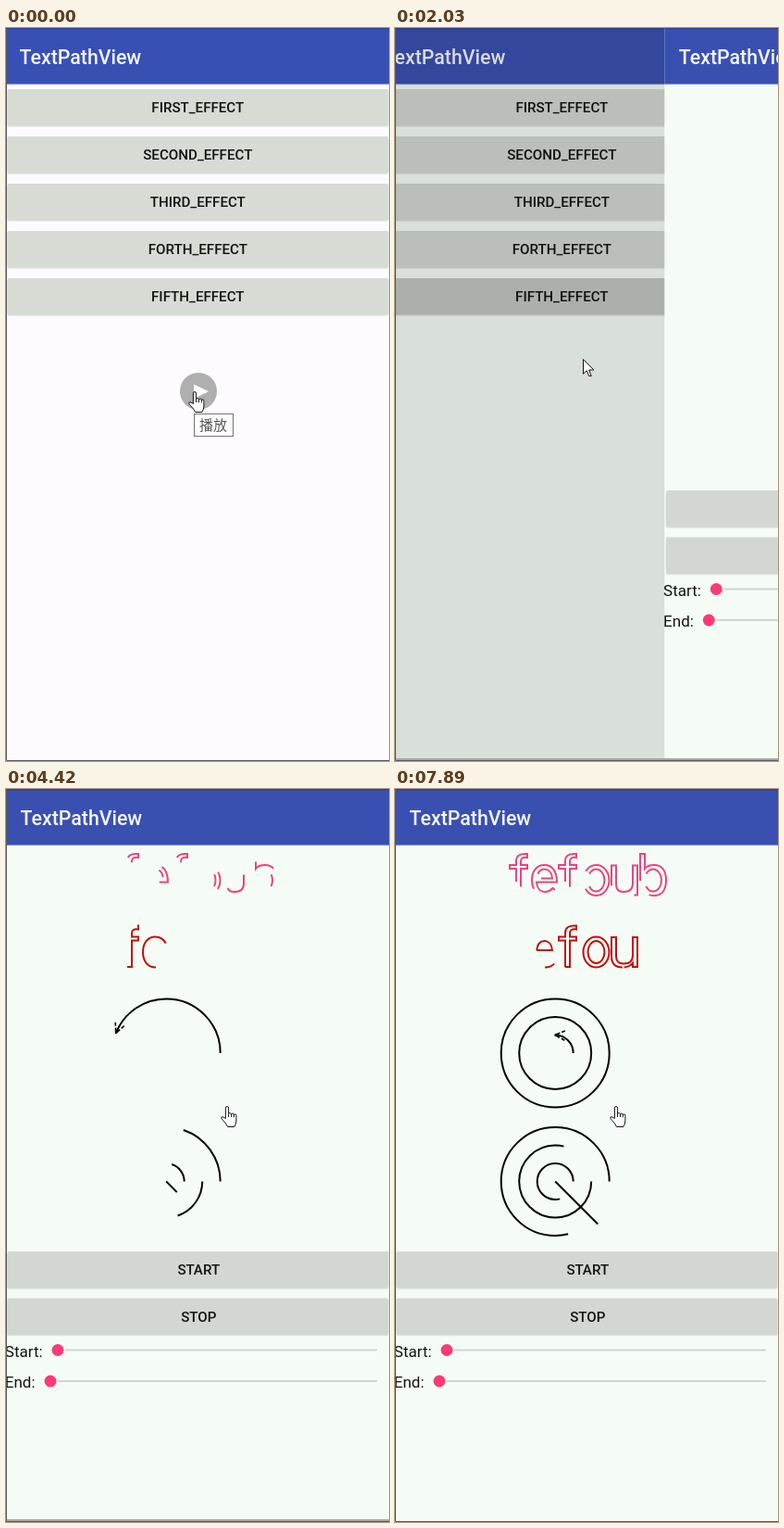
An HTML page that plays this animation: 414x791 px, repeating every 8 s.

```html
<!DOCTYPE html>
<html lang="en">
<head>
<meta charset="utf-8">
<title>Text path drawing</title>
<style>
  html, body { margin: 0; width: 414px; height: 791px; overflow: hidden; }
  svg {
    display: block; font: 500 15.15px Roboto, sans-serif;
    --bg: #f5fcf5; --bar: #3a50b0; --btn: #d2d7d1;
  }
  svg.cover { --bg: #fdfbfd; --bar: #3850b4; --btn: #d6dbd4; }
  .cover text { transform: translateX(-1px); }
  .bg { fill: var(--bg); }
  .bar { fill: var(--bar); }
  .btn { fill: var(--btn); }
  .title { font-size: 21.3px; fill: #f4f6fb; }
  .caption { text-anchor: middle; fill: #101411; }
  .label { font-size: 17px; font-weight: 400; fill: #101411; }
  .stroke { fill: none; stroke-width: 2; }
  .cursor { fill: #fff; stroke: #111; stroke-linejoin: round; }
</style>
</head>
<body>
<svg id="stage" width="414" height="791" viewBox="0 0 414 791">
  <g id="menu"></g>
  <g id="page"></g>
  <rect id="progressBar" x="1" y="788" width="413" height="2" fill="#a4aaa5"/>
  <path d="M.5 0V790.5H414" fill="none" stroke="#5a5a5a"/>
  <g id="player">
    <circle cx="208" cy="392" r="20" fill="#b0afb0"/>
    <path d="M203 384.5V400L219 392.2z" fill="#fff"/>
    <rect x="203.5" y="416.5" width="42" height="24" fill="#fff" stroke="#767676"/>
    <text x="210" y="434" fill="#575757" style="font:400 15px 'Noto Sans CJK SC','Noto Sans CJK',sans-serif">播放</text>
  </g>
  <g id="cursor" class="cursor">
    <path id="arrow" d="M.5.5V16.3L4.2 12.8 6.8 18.6H9.2L6.7 12H11.8z"/>
    <g id="hand" transform="translate(-6 -1)">
      <path d="M5.4 13.5V2.2a1.6 1.6 0 0 1 3.2 0V8.6a1.5 1.5 0 0 1 2.9.6a1.4 1.4 0 0 1 2.8.7a1.3 1.3 0 0 1 2.6.9V16q0 3-2 6.500H7.6Q6 19 2.6 15.6 0 13 .9 12.1 2.2 11 5.4 13.5z"/>
      <path d="M8.6 8.6V12M11.5 9.2V12M14.3 9.9V12.4" fill="none"/>
    </g>
  </g>
</svg>
<script>
const LOOP = 8000;
const $ = id => document.getElementById(id);
const el = (parent, tag, attrs) => {
  const node = document.createElementNS('http://www.w3.org/2000/svg', tag);
  for (const k in attrs) node.setAttribute(k, attrs[k]);
  return parent.appendChild(node);
};
const show = (node, on) => node.setAttribute('visibility', on ? 'inherit' : 'hidden');

// Linear interpolation through [time, value] knots
function track(t, knots) {
  const i = knots.findIndex(k => k[0] > t);
  if (i === 0) return knots[0][1];
  if (i < 0) return knots[knots.length - 1][1];
  const [t0, v0] = knots[i - 1], [t1, v1] = knots[i];
  return v0 + (v1 - v0) * (t - t0) / (t1 - t0);
}

// The screen refreshes in runs of even steps: [first, last, count]
const runs = [[150, 1140, 8], [1260, 2170, 8], [2410, 3310, 8], [3470, 4420, 8],
  [4570, 5560, 8], [5710, 6690, 9], [6810, 7740, 8], [7890, 7890, 1]];
function snap(t) {
  const run = runs.filter(r => r[0] <= t).pop();
  if (!run) return 0;
  const [first, last, n] = run, gap = (last - first) / (n - 1) || 1;
  return first + Math.min(n - 1, Math.floor((t - first) / gap + 1e-6)) * gap;
}

// App screens
function screen(g) {
  el(g, 'rect', { class: 'bg', width: 414, height: 790 });
  el(g, 'rect', { y: 61, width: 414, height: 1, fill: '#000', opacity: .06 });
  el(g, 'rect', { class: 'bar', width: 414, height: 60.6 });
  el(g, 'rect', { width: 414, height: 1.5, fill: '#000', opacity: .15 });
  el(g, 'text', { class: 'title', x: 15.5, y: 39 }).textContent = 'TextPathView';
}
function button(g, y, text) {
  const box = { x: 1.5, y, width: 412, height: 39.5, rx: 2 };
  el(g, 'rect', { ...box, y: y + 1.2, fill: '#000', opacity: .1 });
  el(g, 'rect', { ...box, class: 'btn' });
  const press = el(g, 'rect', { ...box, fill: '#000', opacity: .08, visibility: 'hidden' });
  el(g, 'text', { class: 'caption', x: 208.3, y: y + 25 }).textContent = text;
  return press;
}
function slider(g, y, text, x) {
  el(g, 'text', { class: 'label', x: -1.2, y: y + 7 }).textContent = text;
  el(g, 'rect', { x: x + 8, y: y - 1, width: 393 - x, height: 2, fill: '#cfd6cf' });
  el(g, 'circle', { cx: x, cy: y, r: 6.5, fill: '#fb3b77' });
}

const menu = $('menu'), page = $('page');
screen(menu);
const [fifthPress] = ['FIRST', 'SECOND', 'THIRD', 'FORTH', 'FIFTH']
  .map((name, i) => button(menu, 66 + 51 * i, name + '_EFFECT')).slice(-1);
const shade = el(menu, 'rect', { width: 450, height: 790, fill: '#000' });
screen(page);
const startPress = button(page, 499, 'START');
button(page, 549.5, 'STOP');
slider(page, 605.5, 'Start:', 56);
slider(page, 639, 'End:', 48);

// Outline lettering: one entry per contour
const oval = (x, y, rx, ry) =>
  `M${x - rx} ${y}a${rx} ${ry} 0 0 1 ${2 * rx} 0a${rx} ${ry} 0 0 1 ${-2 * rx} 0`;
const letterF = x => `M${x + 7} 114.5V86h-7v-4h7v-4q0-9 12-8v4q-7-1-7 4v4h7v4h-7v28.5z`;
const word = [
  letterF(124),
  'M162 115C153 115 148 108 148 98.5S153 82 161.5 82S175 89 175 100.5H153C153.5 107 157 111 162 111Q167 111 170.5 107L173.5 109.5Q169.5 115 162 115z',
  'M153.2 96.5C154 90 157 86.5 161.5 86.5S169.5 90 170 96.5z',
  letterF(177),
  oval(217.5, 98.5, 14, 16.5), oval(217.5, 98.5, 9, 12),
  'M246 115Q234 115 234 103V82.5H239V103Q239 111 247 111Q257 111 257 102V82.5H262V114.5H257V110.5Q253 115 246 115z',
  'M265 114.5V70H270V86Q273 82 280 82C289 82 293 89 293 98.5S289 115 280 115Q273 115 270 110.5V114.5z',
  oval(279, 98.5, 9, 12)
];

// Rings: dir -1 runs over the top, 1 runs under the bottom
const CENTER = 173.2;
const ring = (y, r, dir) => {
  const sweep = dir > 0 ? 1 : 0;
  return `M${CENTER + r} ${y}a${r} ${r} 0 0 ${sweep} ${-2 * r} 0a${r} ${r} 0 0 ${sweep} ${2 * r} 0`;
};
const target = y => [ring(y, 58.5, -1), ring(y, 39, 1), ring(y, 19.5, -1),
  `M${CENTER} ${y}l58.5 58.5`];

function group(contours, color, dy = 0) {
  const g = el(page, 'g', { class: 'stroke', stroke: color, transform: `translate(0 ${dy})` });
  return contours.map(d => {
    const node = el(g, 'path', { d });
    return { node, len: node.getTotalLength() };
  });
}
function reveal({ node, len }, from, to) {
  const a = Math.max(0, from), b = Math.min(len, to);
  show(node, b > a);
  node.setAttribute('stroke-dasharray', `0 ${a} ${b - a} ${len + 1}`);
}
const together = (paths, a, b) => paths.forEach(p => reveal(p, a * p.len, b * p.len));
const total = paths => paths.reduce((sum, p) => sum + p.len, 0);
function inTurn(paths, a, b) {
  const all = total(paths);
  let at = 0;
  for (const p of paths) {
    reveal(p, a * all - at, b * all - at);
    at += p.len;
  }
}

const pink = group(word, '#e8457f');
const red = group(word, '#c20d0d', 77.5);
const rings = group(target(285), '#000');
const spread = group(target(423.5), '#000');
const barbs = el(page, 'path', { class: 'stroke', stroke: '#000',
  style: 'stroke-width:1.6;stroke-dasharray:6 2 4 1.5' });

// Arrow head trailing back from the pen tip
function drawBarbs(p) {
  show(barbs, p > 0);
  let at = p * total(rings), i = 0;
  while (i < rings.length - 1 && at > rings[i].len) at -= rings[i++].len;
  const { node } = rings[i];
  const tip = node.getPointAtLength(at), back = node.getPointAtLength(Math.max(0, at - 3));
  const angle = Math.atan2(back.y - tip.y, back.x - tip.x);
  barbs.setAttribute('d', [-.44, .44].map(turn =>
    `M${tip.x} ${tip.y}l${13 * Math.cos(angle + turn)} ${13 * Math.sin(angle + turn)}`).join(''));
}

function draw(t) {
  const playing = t >= 150;
  $('stage').setAttribute('class', playing ? '' : 'cover');
  show($('player'), !playing);
  show($('progressBar'), playing && t < 5000);

  const slide = track(t, [[1850, 414], [1910, 291.3], [2040, 70], [2170, 0]]);
  const moved = 414 - slide;
  menu.setAttribute('transform', `translate(${-moved * .228} 0)`);
  page.setAttribute('transform', `translate(${slide} 0)`);
  show(page, moved > 0);
  shade.setAttribute('opacity', moved / 414 * .38);
  show(fifthPress, t >= 1640);
  show(startPress, t >= 3150 && t < 3450);

  const x = track(t, [[2170, 203], [2790, 370], [3300, 370], [3900, 238]]);
  const y = track(t, [[1390, 393], [1910, 357], [2170, 357], [2790, 384], [3300, 384], [3900, 343]]);
  const hand = !playing || t >= 3800;
  $('cursor').setAttribute('transform', `translate(${x} ${y})`);
  show($('hand'), hand);
  show($('arrow'), !hand);

  const p = track(t, [[3260, 0], [4420, .198], [6570, .567], [7890, .787]]);
  together(pink, .5 - p / 2, .5 + p / 2);
  inTurn(red, p / 3, p);
  inTurn(rings, 0, p);
  together(spread, 0, p);
  drawBarbs(p);
}

const begin = performance.now();
function tick() {
  draw(snap((performance.now() - begin) % LOOP));
  requestAnimationFrame(tick);
}
tick();
</script>
</body>
</html>
```
